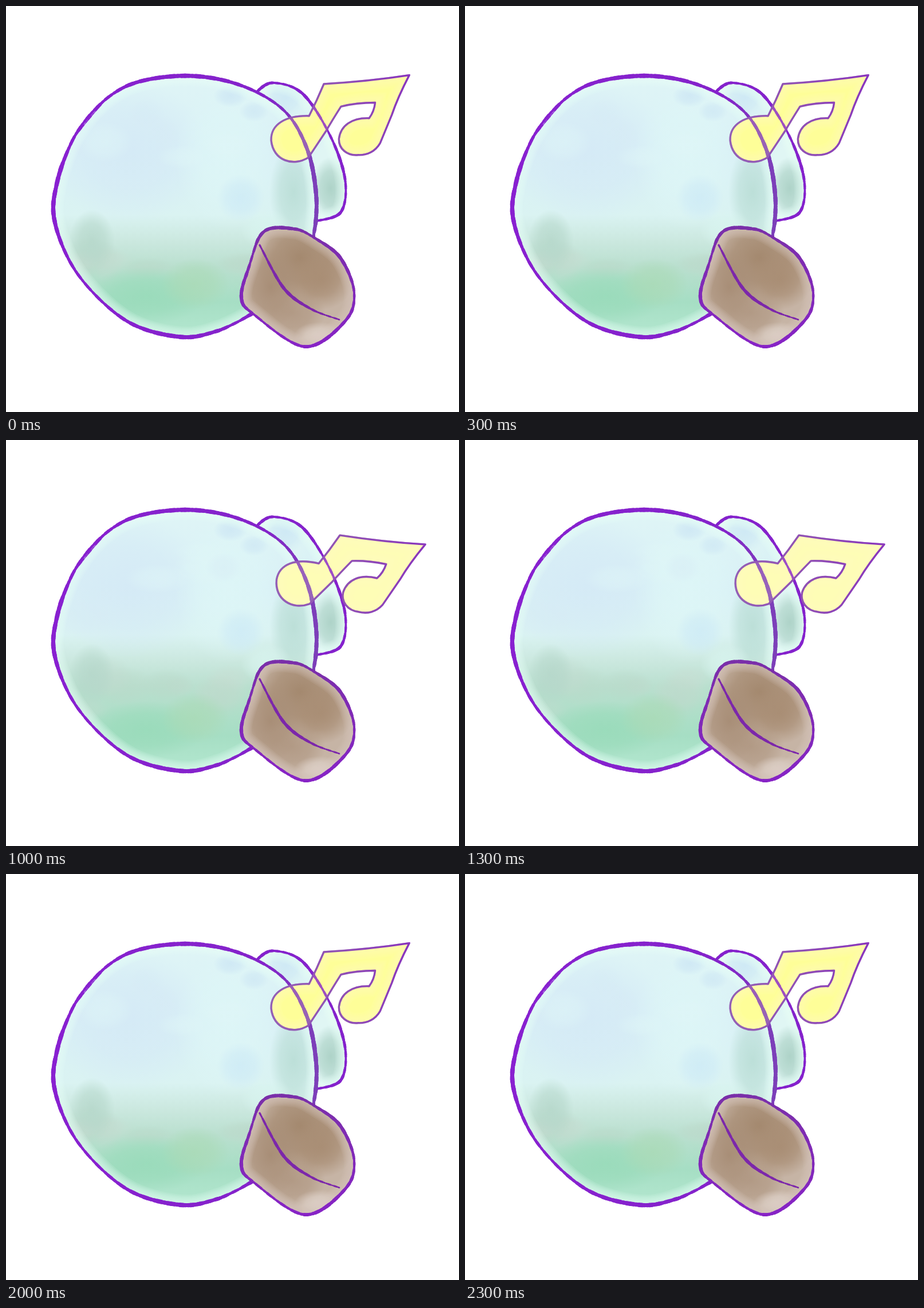
An HTML page with a canvas for the animation above (2500 ms loop, 791 px wide and 708 px high).

```html
<!DOCTYPE html>
<html lang="en">
<head>
<meta charset="utf-8">
<title>Music bulb</title>
<style>
html, body { margin: 0; width: 100%; height: 100%; overflow: hidden; background: #fff; }
canvas { display: block; }
</style>
</head>
<body>
<canvas id="stage" width="791" height="708"></canvas>
<script>
const ctx = document.getElementById('stage').getContext('2d');
const TAU = Math.PI * 2;
const STEP = 500;
const ORDER = [0, 1, 2, 1, 0];

// The note swings about the centre of its left head.
const POSES = [
  { x: 497, y: 233, turn: -5.5, yellow: '#fefe98', horizon: 410, seed: 11 },
  { x: 505, y: 241, turn: 0, yellow: '#fefda6', horizon: 400, seed: 23 },
  { x: 506, y: 249, turn: 6.5, yellow: '#fefcb6', horizon: 385, seed: 37 }
];

// Key points, joined by smooth curves.
const BULB = smooth('537,403 542,335 526,250 483,180 400,135 300,122 200,145 126,217 87,318 88,388 130,474 212,550 304,577 370,566 431,537');
const LOBE = smooth('437,150 466,134 518,153 566,226 592,302 585,359 543,375');
const CUP = smooth('537,403 583,438 608,500 590,552 521,594 433,538 411,508 425,452 451,393 505,389 537,403');
const RIM = smooth('443,417 485,492 532,528 582,547');
const NOTE = new Path2D(`M67-91Q145-88 217-92Q193-55 180-26L155 21C145 35 130 40 115 38
  C95 38 82 24 84 7C89-16 110-28 140-24Q150-35 153-50Q120-53 93-49
  Q75-26 63-9L28 34C0 48-34 34-34-2C-32-30-5-43 36-38Q52-63 67-91Z`);

function smooth(text) {
  const pts = text.split(' ').map(p => p.split(',').map(Number));
  const at = i => pts[Math.max(0, Math.min(pts.length - 1, i))];
  const out = [];
  for (let i = 0; i < pts.length - 1; i++) {
    const [a, b, c, d] = [at(i - 1), at(i), at(i + 1), at(i + 2)];
    for (let t = 0; t < 1; t += 1 / 16) {
      out.push([0, 1].map(j => {
        const k1 = c[j] - a[j];
        const k2 = 2 * a[j] - 5 * b[j] + 4 * c[j] - d[j];
        const k3 = 3 * (b[j] - c[j]) + d[j] - a[j];
        return b[j] + t * (k1 + t * (k2 + t * k3)) / 2;
      }));
    }
  }
  out.push(at(pts.length));
  return out;
}

function outline(pts) {
  const path = new Path2D();
  pts.forEach(([x, y]) => path.lineTo(x, y));
  path.closePath();
  return path;
}

function random(seed) {
  return () => (seed = seed * 16807 % 2147483647) / 2147483647;
}

function ramp(x0, y0, x1, y1, stops) {
  const g = ctx.createLinearGradient(x0, y0, x1, y1);
  stops.forEach(([at, color]) => g.addColorStop(at, color));
  return g;
}

// Pen line whose pressure rises and falls along the way.
function ink(pts, color, width, swing = 0, cycles = 4) {
  ctx.strokeStyle = color;
  ctx.lineCap = 'round';
  for (let i = 1; i < pts.length; i++) {
    const u = i / pts.length;
    ctx.lineWidth = width + swing * Math.cos(TAU * (cycles * u - .4)) + .5 * Math.sin(i * 1.7);
    ctx.beginPath();
    ctx.moveTo(...pts[i - 1]);
    ctx.lineTo(...pts[i]);
    ctx.stroke();
  }
}

// Second, thinner line that wanders around the first.
function resketch(pts, color, drift) {
  ink(pts.map(([x, y], i) => {
    const d = drift * Math.sin(i * .19);
    return [x + d, y + d * .6];
  }), color, 1.8);
}

function spot(x, y, rx, ry, color, alpha = .8) {
  ctx.save();
  ctx.translate(x, y);
  ctx.scale(rx, ry);
  const g = ctx.createRadialGradient(0, 0, 0, 0, 0, 1);
  g.addColorStop(0, color);
  g.addColorStop(.55, color + 'b0');
  g.addColorStop(1, color + '00');
  ctx.globalAlpha = alpha;
  ctx.fillStyle = g;
  ctx.fillRect(-1, -1, 2, 2);
  ctx.restore();
}

function mottle(seed, count, top, bottom, colors) {
  const rnd = random(seed);
  for (let i = 0; i < count; i++) {
    const x = 130 + 300 * rnd(), y = top + (bottom - top) * rnd();
    spot(x, y, 25 + 40 * rnd(), 15 + 25 * rnd(), colors[i % colors.length], .5);
  }
}

// Fills a shape, lets `details` paint inside, then fades it towards the edge.
function paint(path, base, glow, details) {
  ctx.save();
  ctx.clip(path);
  ctx.fillStyle = base;
  ctx.fill(path);
  details();
  ctx.strokeStyle = glow;
  ctx.globalAlpha = .12;
  for (let w = 6; w <= 36; w += 5) {
    ctx.lineWidth = w;
    ctx.stroke(path);
  }
  ctx.restore();
}

function paintLobe() {
  spot(488, 160, 38, 40, '#cbe6f5');
  spot(530, 210, 35, 55, '#d9f1f6');
  spot(567, 318, 34, 55, '#aed3c8', 1);
}

function paintBulb({ horizon, seed }) {
  spot(215, 255, 140, 125, '#d4e9f6');
  spot(390, 260, 95, 130, '#def7f7');
  spot(410, 335, 42, 42, '#cdeaf6');
  spot(392, 157, 30, 20, '#cde6f4');
  spot(433, 184, 26, 18, '#cfe8f4');
  spot(502, 325, 42, 85, '#b9ddd5', .9);
  mottle(seed, 6, 180, 330, ['#d6ebf5', '#dff6f7']);
  mottle(seed + 1, 8, horizon + 25, 470, ['#c1dbcf', '#b9d8c8', '#c9ddd3']);
  spot(150, 410, 40, 55, '#b4d6c9');
  spot(245, 505, 105, 50, '#99dbba', .9);
  spot(330, 485, 60, 45, '#aadab6');
  spot(455, 390, 45, 35, '#d9f5f0');
}

function paintCup() {
  spot(515, 440, 85, 75, '#a3886e', 1);
  spot(550, 475, 58, 55, '#a98e75', 1);
  spot(462, 490, 55, 70, '#a88e77', 1);
  spot(500, 535, 58, 46, '#ad947e');
  spot(548, 575, 45, 24, '#e2d6ce');
}

const bulb = outline(BULB), lobe = outline(LOBE), cup = outline(CUP);
const bulbInk = ramp(84, 0, 543, 0, [[0, '#8820d0'], [.8, '#8423ca'], [1, '#7c40b8']]);
const cupInk = ramp(0, 385, 0, 595, [[0, '#7a2fa9'], [1, '#8723c6']]);
const noteInk = ramp(-40, 0, 220, 0, [[0, '#9460b6'], [.5, '#9050b4'], [1, '#8935bd']]);

function onNote({ x, y, turn }, action) {
  ctx.save();
  ctx.translate(x, y);
  ctx.rotate(turn * TAU / 360);
  action();
  ctx.restore();
}

function strokeNote() {
  ctx.strokeStyle = noteInk;
  ctx.lineJoin = 'round';
  ctx.lineWidth = 3.4;
  ctx.stroke(NOTE);
  ctx.translate(1, -1);
  ctx.globalAlpha = .5;
  ctx.lineWidth = 1.5;
  ctx.stroke(NOTE);
}

function veilNote(color) {
  ctx.globalAlpha = .2;
  ctx.fillStyle = color;
  ctx.fill(NOTE);
}

function draw(pose) {
  const h = (pose.horizon - 120) / 460;
  const bulbBase = ramp(0, 120, 0, 580, [
    [0, '#dff5f6'], [.3, '#d9f0f6'], [h - .1, '#daf3f2'], [h, '#cbe8df'],
    [h + .1, '#b9dfce'], [.86, '#a6dec4'], [1, '#b4e8d0']
  ]);
  ctx.fillStyle = '#fff';
  ctx.fillRect(0, 0, 791, 708);

  paint(lobe, '#e0f6f4', '#e4faf6', paintLobe);
  paint(bulb, bulbBase, '#e0faf4', () => paintBulb(pose));
  onNote(pose, () => paint(NOTE, pose.yellow, '#fcf5b8', () => {}));

  ink(LOBE, '#8522cc', 4.5, .7);
  ink(BULB, bulbInk, 6, 1.4);
  resketch(BULB, bulbInk, 3);
  onNote(pose, () => veilNote(pose.yellow));
  onNote(pose, strokeNote);

  paint(cup, '#c6b4a5', '#d3c5b9', paintCup);
  ink(CUP, cupInk, 5, 1);
  resketch(CUP, cupInk, 2);
  ink(RIM, '#7c27ab', 4, 1.5, 1);
}

let shown;
const start = performance.now();
function tick() {
  const t = performance.now() - start;
  const pose = POSES[ORDER[Math.floor(t / STEP) % ORDER.length]];
  if (pose !== shown) draw(shown = pose);
  requestAnimationFrame(tick);
}
tick();
</script>
</body>
</html>
```
